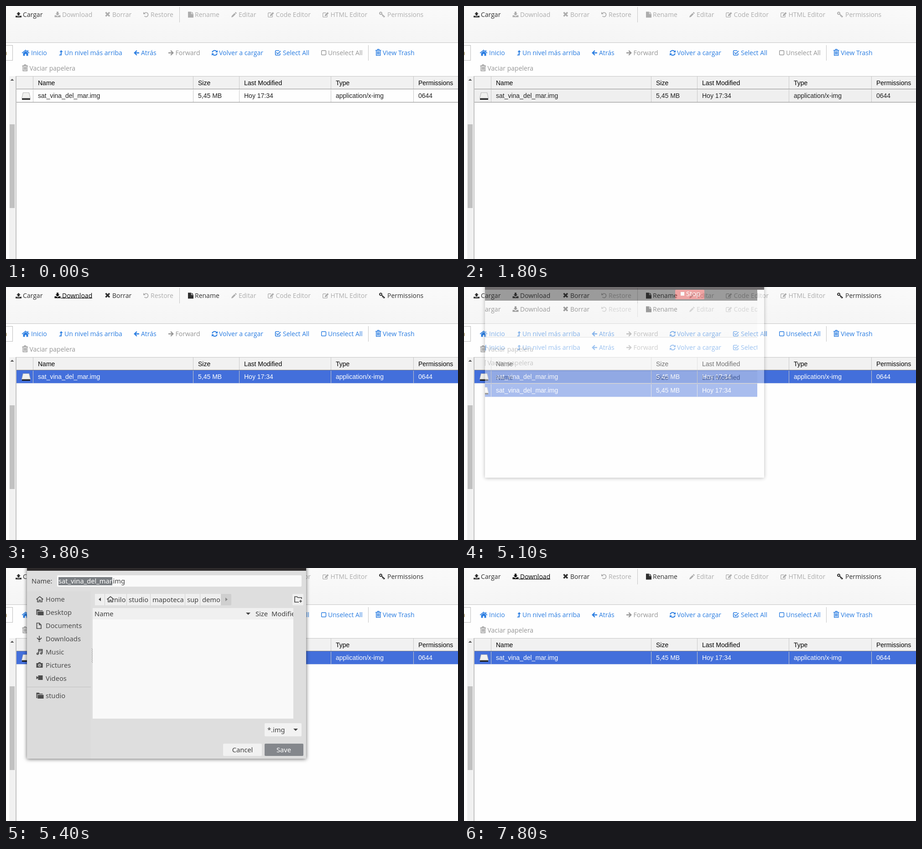
An HTML page that plays this animation: 991x556 px, repeating every 8 s.

```html
<!DOCTYPE html>
<html lang="es">
<head>
<meta charset="utf-8">
<title>File manager download</title>
<style>
html, body { margin: 0; width: 100%; height: 100%; overflow: hidden; background: #fff; }
svg { display: block; }
text { white-space: pre; }
.item { font: 14px "Open Sans", sans-serif; fill: currentColor; }
.ic { fill: none; stroke: currentColor; }
.on { color: #2e2e2e; }
.off, .need { color: #adadad; }
.dim, .mark { color: #969696; }
.link { color: #2a7de1; }
.grid { font: 14px "Liberation Sans", Arial, sans-serif; }
.line, .row .line { fill: #c8c8c8; }
.row { fill: #222; }
.back { fill: #fefefe; }
.edge { fill: #858585; }
.under { display: none; }
.hover .back { fill: #efefef; }
.sel .need { color: #2e2e2e; }
.sel .mark { color: #2a7de1; }
.sel .row { fill: #fff; }
.sel .back { fill: #436fdb; }
.left .edge { fill: #b9c5e6; }
.up .up, .down .down { color: #1b62c0; }
.down .down { color: #000; }
.up .up .under, .down .down .under { display: inline; }
#dialog { font: 14.7px "Noto Sans", "Open Sans", sans-serif; fill: #3f3f3f; }
.side { color: #4c4c4c; fill: #4c4c4c; }
</style>
</head>
<body>
<svg id="stage" width="991" height="556" viewBox="0 0 991 556"></svg>
<script>
const rect = (x, y, w, h, fill, more = '') =>
  `<rect x="${x}" y="${y}" width="${w}" height="${h}" fill="${fill}" ${more}/>`;
const bar = (x, y, w, h, cls) => `<rect x="${x}" y="${y}" width="${w}" height="${h}" class="${cls}"/>`;
const text = (x, y, s, more = '') => `<text x="${x}" y="${y}" ${more}>${s}</text>`;
const path = (d, fill) => `<path d="${d}" fill="${fill}"/>`;

// name: [filled path, stroked path, stroke width]
const icons = {
  upload: ['M6.5 0L11 4.5H8.5V8H4.5V4.5H2zM0 8.5H3.5V9.5H9.5V8.5H13V12H0z'],
  download: ['M4.5 0H8.5V4H11L6.5 8.5 2 4H4.5zM0 8H3.5L6.5 10.5 9.5 8H13V12H0z'],
  cross: ['', 'M1.5 1.5L10 10M10 1.5L1.5 10', 3.2],
  undo: ['M0 0V5H5z', 'M2.5 3A4.6 4.6 0 1 1 2.5 9', 1.8],
  file: ['M0 0H7V5H12V13H0zM8 0L12 4H8z'],
  pencil: ['M0 12L1 8.5 7 2.5 9.5 5 3.5 11zM7.8 1.7L9.3 0 12 2.7 10.3 4.2z'],
  edit: ['M5 9V6.5L11 .5 13.5 3 7.5 9z', 'M10.4 7V10Q10.4 11.4 9 11.4H2.2Q.7 11.4 .7 10V3.5Q.7 2 2.2 2H7.5', 1.3],
  key: ['', 'M5.8 5.5L12.5 11.5M8.5 8L7 10M11 10.3L9.5 12M3.6 1A2.5 2.5 0 1 1 3.5 1z', 2],
  home: ['M3 7.5L8.5 3 14 7.5V13.5H10V9.5H7V13.5H3z', 'M.7 7.3L8.5 1 16.3 7.3M13.5 1V4', 1.7],
  level: ['M0 11.5H6V4H8.6L5 0 1.4 4H3.8V9.6H1.8z'],
  left: ['', 'M12 6H2M6.8 1L1.8 6 6.8 11', 2.4],
  right: ['', 'M0 6H10M5.2 1L10.2 6 5.2 11', 2.4],
  refresh: ['M13 0V5H8zM0 12V7H5z', 'M1.2 5A5.4 5.4 0 0 1 10.5 2.5M11.8 7A5.4 5.4 0 0 1 2.5 9.5', 2],
  check: ['', 'M10.8 7V9.5Q10.8 11 9.3 11H2.2Q.7 11 .7 9.5V2.5Q.7 1 2.2 1H9M3 5.2L5.8 8 12 1.8', 1.7],
  square: ['', 'M2 1H9Q10.5 1 10.5 2.5V9Q10.5 10.5 9 10.5H2Q.7 10.5 .7 9V2.5Q.7 1 2 1z', 1.4],
  trash: ['', 'M0 3H12.5M4 3L4.5 .8H8L8.5 3M1.7 3V14H10.8V3M4.2 5V12M6.3 5V12M8.4 5V12', 1.4],
  house: ['', 'M0 7L7.5 .9 15 7M2.5 6V12.5H6V8.5H9V12.5H12.5V6', 1.7],
  folder: ['M0 0H6L7.5 2H14V3.5H2V12H0zM3 4.8H16V13H3z'],
  page: ['', 'M1 1H6.5L10.5 5V13H1zM6.5 1V5H10.5', 1.7],
  arrow: ['', 'M6.5 0V8M1.5 4.5L6.5 9.5 11.5 4.5M5 12.3H8', 1.8],
  music: ['', 'M5 10V1H13V9M5 4H13M2.8 8.7A1.7 1.7 0 1 0 2.9 8.7M10.8 7.7A1.7 1.7 0 1 0 10.9 7.7', 1.8],
  camera: ['M0 2H4L5 0H9L10 2H14V12H0zM7 3.5A3.4 3.4 0 1 0 7.1 3.5z', 'M7 5.5A1.5 1.5 0 1 0 7.1 5.5', 1.2],
  video: ['M0 1.5L4 4V6L0 8.5zM4 0H14V10H4z']
};
const icon = (name, x, y) => {
  const [fill, stroke = '', width = 1] = icons[name];
  return `<g transform="translate(${x} ${y})"><path d="${fill}" fill="currentColor" fill-rule="evenodd"/>` +
    `<path class="ic" d="${stroke}" stroke-width="${width}"/></g>`;
};
const item = (name, ix, iy, tx, base, label, cls, width = 0) =>
  `<g class="item ${cls}">${icon(name, ix, iy)}${text(tx, base, label)}` +
  (width ? rect(tx - 3, base, width + 3, 1, 'currentColor', 'class="under"') : '') + '</g>';

const tools = [
  ['upload', 21, 13, 37, 'Cargar', 'on'],
  ['download', 106.5, 12.5, 123, 'Download', 'need down', 66],
  ['cross', 217, 12.5, 233, 'Borrar', 'need'],
  ['undo', 301, 13, 317, 'Restore', 'off'],
  ['file', 399, 12.5, 414, 'Rename', 'need'],
  ['pencil', 494, 13, 510, 'Editar', 'off'],
  ['edit', 574, 13, 591.5, 'Code Editor', 'off'],
  ['edit', 694, 13, 711.5, 'HTML Editor', 'off'],
  ['key', 818, 12.5, 836, 'Permissions', 'need']
].map(([n, x, y, tx, s, c, w]) => item(n, x, y, tx, 24, s, c, w)).join('');

const links = [
  ['home', 34.5, 96, 55, 'Inicio', 'link'],
  ['level', 116, 97, 128, 'Un nivel más arriba', 'link up', 126],
  ['left', 280, 97, 296, 'Atrás', 'link'],
  ['right', 356, 97, 371.5, 'Forward', 'dim'],
  ['refresh', 451, 97, 467, 'Volver a cargar', 'link'],
  ['check', 590, 97, 607, 'Select All', 'link'],
  ['square', 691, 97, 706, 'Unselect All', 'mark'],
  ['trash', 810, 94.5, 826, 'View Trash', 'link']
].map(([n, x, y, tx, s, c, w]) => item(n, x, y, tx, 108, s, c, w)).join('');

const columns = [
  [59, 'Name', 'sat_vina_del_mar.img'],
  [410, 'Size', '5,45 MB'],
  [511, 'Last Modified', 'Hoy 17:34'],
  [712, 'Type', 'application/x-img'],
  [893, 'Permissions', '0644']
];
const cells = (k, base, y) => columns.map(c =>
  bar(c[0], y, 1, 28, 'line') + text(c[0] + 11, base, c[k])).join('');
const disk = path('M37 190H51L54 203H34z', '#b9b9b9') + path('M38 191H50L52.5 201H35.5z', '#f1f1ef') +
  rect(35, 202, 18, 4, '#1d1d1d') + rect(35, 201.5, 18, 1.5, '#e4e4e4');

const page = `<g id="page">
  ${rect(0, 0, 991, 556, '#fefefe')}${rect(0, 0, 991, 80, 'url(#shade)')}${rect(0, 80, 991, 1, '#c4c4c4')}
  ${rect(380, 2, 1, 34, '#c6c6c6')}${rect(794, 86, 1, 34, '#c6c6c6')}
  ${rect(-5, 86.5, 19.5, 33, '#fff', 'stroke="#bdbdbd"')}
  ${text(-5.5, 108, 'a', 'class="item" style="color:#8a7433"')}
  ${tools}${links}${item('trash', 35.5, 128.5, 51.5, 142, 'Vaciar papelera', 'dim')}
  ${rect(7, 154, 14, 402, '#f1f1f1')}${path('M9.5 164L13.5 160 17.5 164z', '#505050')}
  ${rect(8, 260, 11, 184, '#c1c1c1')}${rect(21, 154, 2, 402, '#c3c3c3')}
  <g class="grid">${rect(23, 154, 968, 29, '#f1f1f1')}${rect(23, 154, 968, 1, '#c6c6c6')}${cells(1, 174, 155)}
    <g class="row">${bar(23, 183, 968, 28, 'back')}${cells(2, 202, 184)}${disk}
      ${rect(23, 182, 968, 1, '#888')}${bar(23, 211, 968, 1, 'edge')}</g>
  </g></g>`;

const places = ['house Home', 'folder Desktop', 'page Documents', 'arrow Downloads', 'music Music',
  'camera Pictures', 'video Videos', 'folder studio'];
const sidebar = places.map((p, i) => {
  const [name, label] = p.split(' '), y = i < 7 ? 69 + 29 * i : 281;
  return icon(name, 66.5, y - 7) + text(87, y + 5, label);
}).join('');
const crumbs = [[195, 21], [217, 47], [265, 51, 'studio'], [317, 75, 'mapoteca'], [393, 32, 'sup'],
  [426, 45, 'demo']].map(([x, w, s = '']) => rect(x, 57, w, 25, '#efefef') + text(x + 4, 75, s)).join('');
const grip = Array.from({ length: 16 }, (_, i) => rect(188 + i % 2, 177 + 2 * i, 1, 1, '#777')).join('');

const content = `${rect(46, 6, 612, 413, '#dedede')}
  ${text(56, 34, 'Name:')}${rect(112, 16, 536, 25, '#fafafa', 'rx="2"')}${rect(115, 20, 118, 18, '#7b7f83')}
  ${text(115, 34, '<tspan fill="#fff">sat_vina_del_mar</tspan>.img')}
  ${rect(46, 51, 140, 368, '#dbdbdb')}${rect(46, 261, 140, 1, '#c2c2c2')}
  <g class="side">${sidebar}</g>${grip}
  ${rect(195, 57, 299, 25, '#cfcfcf', 'rx="2"')}${crumbs}
  ${path('M208 65V73L203 69z', '#444')}${path('M481 65V73L486 69z', '#888')}
  <g class="side">${icon('house', 221.5, 62)}</g>${text(237, 75, 'nilo')}
  ${rect(628, 57, 24, 25, '#efefef', 'rx="2"')}
  <path d="M642 75H633V63H638L640 65H648V68M643 73H649M646 70V76" fill="none" stroke="#444" stroke-width="1.6"/>
  ${rect(190, 88, 440, 243, '#f9f9f9')}${rect(190, 88, 440, 25, '#f0f0f0')}
  ${text(194, 106, 'Name')}${path('M526 98H536L531 103z', '#444')}${text(547, 106, 'Size')}
  <g clip-path="url(#list)">${text(582, 106, 'Modified')}</g>
  ${rect(567, 341, 81, 29, '#f2f2f2', 'rx="2"')}${text(573, 361, '*.img')}${path('M630 353H640L635 358z', '#444')}
  ${rect(476, 386, 85, 27, '#f1f1f1', 'rx="2"')}${text(518.5, 405, 'Cancel', 'text-anchor="middle"')}
  ${rect(567, 386, 85, 27, '#84878c', 'rx="2" id="save"')}
  ${text(609, 405, 'Save', 'text-anchor="middle" fill="#fff"')}`;

// the new window first shows stale screen content, 30 px lower
const stale = `${rect(46, 6, 612, 413, '#fefefe')}
  <g clip-path="url(#old)"><use href="#page" y="30"/></g>${rect(46, 6, 597, 24, '#2b2b2b')}
  ${rect(463, 6, 64, 21, '#e2403f', 'rx="2"')}${rect(475, 11, 8, 8, '#fff')}${text(487, 20, 'Stop', 'fill="#fff"')}`;

const $ = id => document.getElementById(id);
$('stage').innerHTML = `<defs>
  <linearGradient id="shade" x2="0" y2="1"><stop stop-color="#fafafa"/><stop offset="1" stop-color="#f5f5f5"/></linearGradient>
  <clipPath id="list">${rect(190, 88, 440, 25, '#000')}</clipPath>
  <clipPath id="old">${rect(46, 30, 597, 389, '#000')}</clipPath></defs>
  ${page}<g id="dialog">
    ${rect(46, -8, 612, 427, '#dedede', 'style="filter:drop-shadow(0 1px 4px #0009)"')}
    ${rect(46, 0, 612, 6, '#2d2a2b')}
    <g id="stale">${stale}</g><g id="content">${content}</g>
  </g>${rect(46, 0, 612, 6, '#2d2a2b', 'id="tint" opacity=".4"')}`;

const show = (id, on) => $(id).style.display = on ? '' : 'none';

function draw(now) {
  const t = now % 8000, within = (a, b) => t >= a && t < b;
  const flags = {
    sel: within(900, 1800) || t >= 2600,
    hover: within(800, 3800),
    left: t >= 3800,
    up: within(3000, 3200),
    down: within(3400, 5100) || t >= 7700
  };
  const cls = Object.keys(flags).filter(k => flags[k]).join(' ');
  if ($('page').getAttribute('class') !== cls) $('page').setAttribute('class', cls);
  show('dialog', within(5100, 7800));
  show('stale', within(5100, 5400));
  show('content', t >= 5400);
  show('tint', within(5100, 5200));
  $('dialog').style.opacity = t < 5200 ? .45 : t >= 7700 ? .5 : 1;
  $('save').style.fill = t < 6900 ? '#84878c' : t < 7200 ? '#909398' : '#75787d';
  requestAnimationFrame(() => draw(performance.now() - start));
}
const start = performance.now();
draw(0);
</script>
</body>
</html>
```
